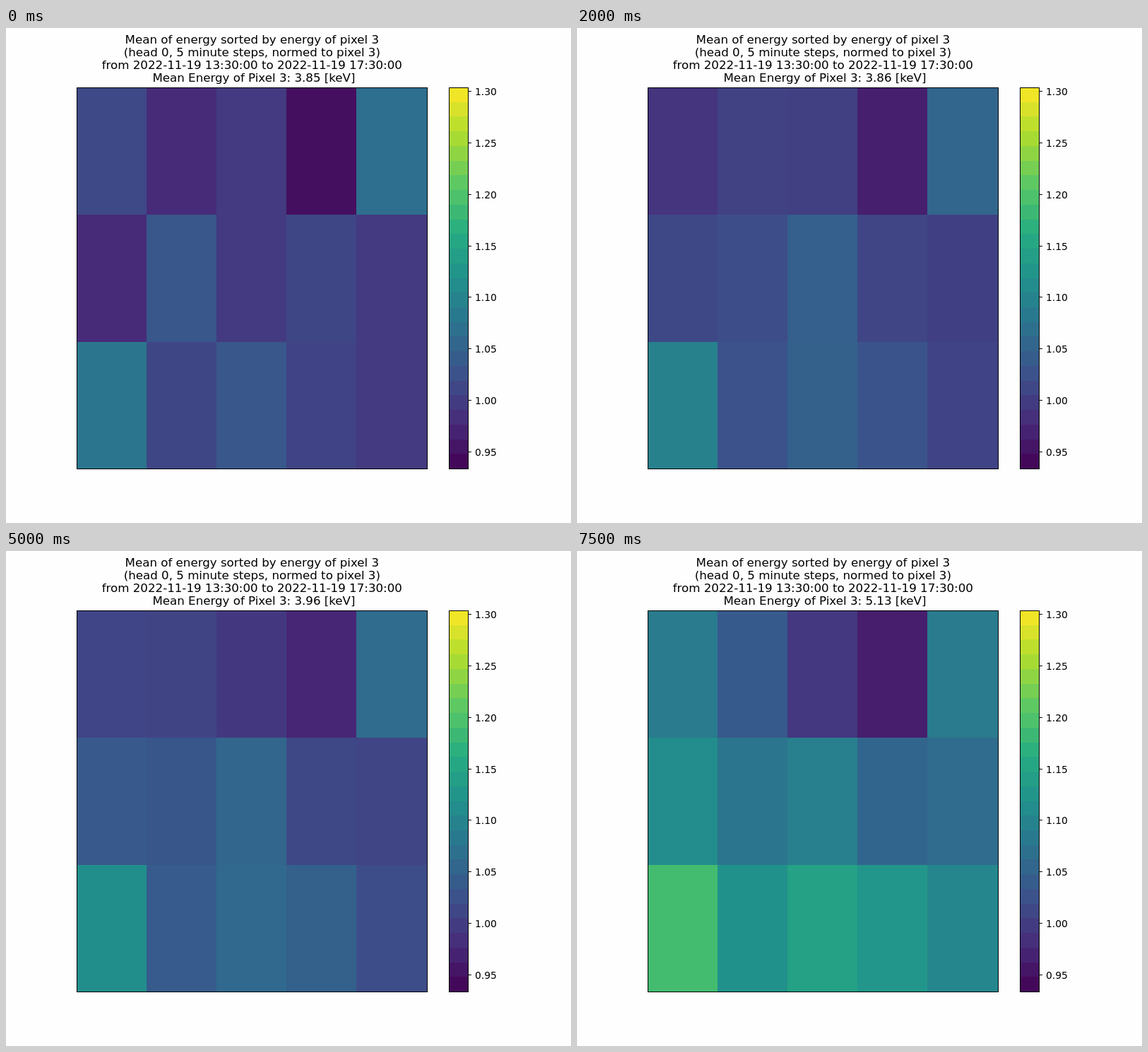
Animation of 800 by 700 pixels, one loop 8 s. Source, as an HTML page with a canvas:

```html
<!DOCTYPE html>
<html lang="en">
<head>
<meta charset="utf-8">
<title>Pixel energy map</title>
<style>
html, body { margin: 0; width: 100%; height: 100%; overflow: hidden; background: #fefefe; }
canvas { display: block; }
</style>
</head>
<body>
<canvas id="stage" width="800" height="700"></canvas>
<script>
const ctx = document.getElementById("stage").getContext("2d");
const STEP = 500, STEPS = 16;
const LEFT = 100, TOP = 84, WIDTH = 496, HEIGHT = 539;
const BAR_X = 627, BANDS = 26;
const FONT = '"DejaVu Sans", Verdana, sans-serif';

// Colour scale from low to high, evenly spaced stops
const STOPS = ["440154", "472d7b", "3b528b", "2c728e", "21918c", "28ae80", "5ec962", "addc30", "fde725"]
  .map(hex => [0, 2, 4].map(i => parseInt(hex.slice(i, i + 2), 16)));

function scale(t) {
  const p = Math.min(Math.max(t, 0), 1) * (STOPS.length - 1);
  const i = Math.min(Math.floor(p), STOPS.length - 2);
  const rgb = STOPS[i].map((v, c) => Math.round(v + (STOPS[i + 1][c] - v) * (p - i)));
  return `rgb(${rgb})`;
}

// Cell levels in percent of the scale: the opening map and the one it settles on
const OPENING = [
  [22, 12, 17, 4, 36],
  [12, 27, 17, 21, 17],
  [39, 21, 27, 20, 17]
];
const SETTLED = [
  [16, 21, 18, 10, 34],
  [23, 23, 31, 21, 19],
  [44, 25, 32, 27, 21]
];

// Repeatable noise in -1..1
function noise(seed) {
  const v = Math.sin(seed * 12.9898) * 43758.5453;
  return 2 * (v - Math.floor(v)) - 1;
}

// Total rise of a cell: even along the bottom row, weak towards the upper middle
function gain(x, y) {
  const dip = 1 - ((x - 2.5) / 2.5) ** 2;
  return 25 - 14 * (2 - y) * dip;
}

function level(n, x, y) {
  if (n === 0) return OPENING[y][x];
  const rise = Math.max(0, (n - 8) / 7) ** 1.6;
  const jitter = 2 * noise(n * 15 + y * 5 + x) * Math.sin(Math.PI * n / (STEPS - 1));
  return SETTLED[y][x] + gain(x, y) * rise + jitter;
}

// Slow drift followed by a steep climb
function meanEnergy(n) {
  return 3.85 + 0.04 * (n / 8) ** 2 + 1.14 / (1 + Math.exp(-1.72 * (n - 11.786)));
}

function fill(color, x0, y0, x1, y1) {
  ctx.fillStyle = color;
  ctx.fillRect(x0, y0, x1 - x0, y1 - y0);
}

function label(text, x, y, size, align) {
  ctx.font = `${size}px ${FONT}`;
  ctx.textAlign = align;
  ctx.fillStyle = "#000";
  ctx.fillText(text, x, y);
}

function outline(x, w) {
  ctx.strokeStyle = "#000";
  ctx.lineWidth = 1;
  ctx.strokeRect(x + 0.5, TOP + 0.5, w, HEIGHT);
}

function drawTitle(n) {
  const lines = [
    "Mean of energy sorted by energy of pixel 3",
    "(head 0, 5 minute steps, normed to pixel 3)",
    "from 2022-11-19 13:30:00 to 2022-11-19 17:30:00",
    ` Mean Energy of Pixel 3: ${meanEnergy(n).toFixed(2)} [keV]`
  ];
  lines.forEach((s, i) => label(s, 348.3, 22 + i * 18, 16.667, "center"));
}

function drawMap(n) {
  const colX = x => LEFT + Math.floor(x * WIDTH / 5);
  const rowY = y => TOP + y * 180;
  for (let y = 0; y < 3; y++) {
    for (let x = 0; x < 5; x++) {
      fill(scale(level(n, x, y) / 100), colX(x), rowY(y), colX(x + 1), rowY(y + 1));
    }
  }
  outline(LEFT, WIDTH);
}

function drawBar() {
  const bandY = i => Math.round(TOP + i * HEIGHT / BANDS);
  for (let i = 0; i < BANDS; i++) {
    fill(scale(1 - (i + 0.5) / BANDS), BAR_X, bandY(i), BAR_X + 28, bandY(i + 1));
  }
  outline(BAR_X, 27);
  for (let i = 0; i < 8; i++) {
    const y = Math.floor(89.3 + i * 72.9);
    fill("#000", 655, y, 659, y + 1);
    label((1.3 - i * 0.05).toFixed(2), 664, y + 6, 13.889, "left");
  }
}

function tick() {
  const n = Math.floor(performance.now() / STEP) % STEPS;
  fill("#fefefe", 0, 0, 800, 700);
  drawTitle(n);
  drawMap(n);
  drawBar();
  requestAnimationFrame(tick);
}
tick();
</script>
</body>
</html>
```
